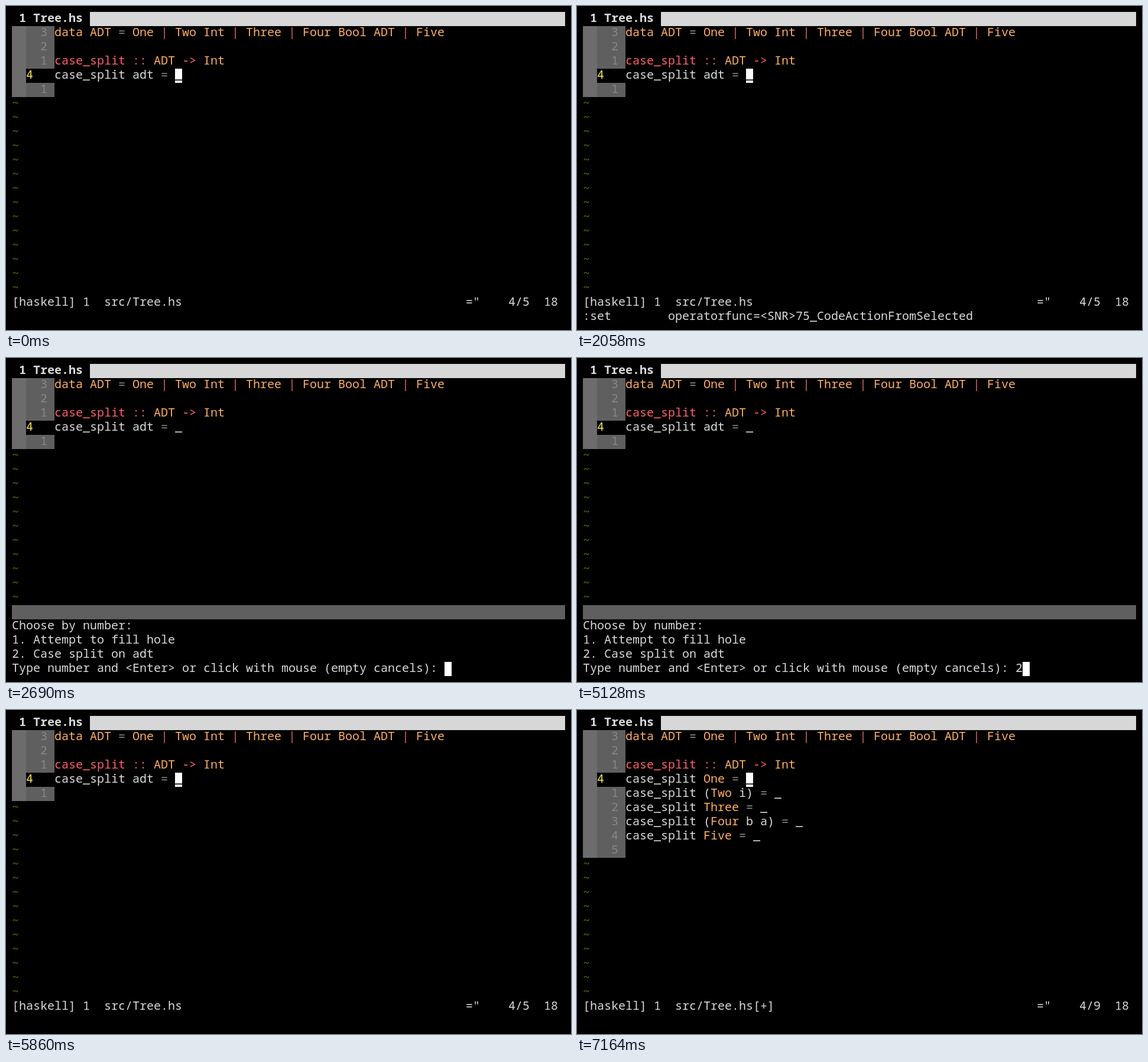
An HTML page with a canvas for the animation above (8 s loop, 956 by 548 pixels).

```html
<!DOCTYPE html>
<html lang="en">
<head>
<meta charset="utf-8">
<title>Case split in the editor</title>
<style>
  html, body { margin: 0; width: 100%; height: 100%; overflow: hidden; background: #000; }
  canvas { display: block; }
</style>
</head>
<body>
<canvas id="screen" width="956" height="548"></canvas>
<script>
const ctx = document.getElementById("screen").getContext("2d");
const LOOP = 8000, CELL_W = 12, CELL_H = 24, PAD = 10, COLS = 78;
const FONT = '20px "Noto Sans Mono", monospace';
const COLOR = {
  text: "#dadada", type: "#ffaf5f", red: "#ff5f6b", pipe: "#e56a62", equals: "#8a8a8a",
  tilde: "#56700c", number: "#878787", current: "#f5e65a",
  sign: "#6c6c6c", gutter: "#5f5f5f", tabs: "#d7d7d7"
};

const HEADER = [
  "data ADT = One | Two Int | Three | Four Bool ADT | Five",
  "",
  "case_split :: ADT -> Int"
];
const BEFORE = [...HEADER, "case_split adt = _", ""];
const AFTER = [
  ...HEADER,
  "case_split One = _",
  "case_split (Two i) = _",
  "case_split Three = _",
  "case_split (Four b a) = _",
  "case_split Five = _",
  ""
];
const CURRENT = 3;
const MENU = [
  "Choose by number:",
  "1. Attempt to fill hole",
  "2. Case split on adt",
  "Type number and <Enter> or click with mouse (empty cancels): "
];

function fill(col, row, width, height, color) {
  ctx.fillStyle = color;
  ctx.fillRect(PAD + col * CELL_W, PAD + row * CELL_H, width * CELL_W, height * CELL_H);
}

function write(text, col, row, color = COLOR.text, weight = "") {
  ctx.font = `${weight} ${FONT}`;
  ctx.fillStyle = color;
  ctx.fillText(text, PAD + col * CELL_W, PAD + row * CELL_H + 17);
}

function cursor(col, row, char = "") {
  fill(col, row, 1, 1, "#fff");
  write(char, col, row, "#000");
}

function tokenColor(token, isSignature) {
  if (/^[A-Z]|^data$/.test(token)) return COLOR.type;
  if (token === "=") return COLOR.equals;
  if (token === "|") return COLOR.pipe;
  return isSignature ? COLOR.red : COLOR.text;
}

function writeCode(line, row) {
  const isSignature = line.includes("::");
  for (const { 0: token, index } of line.matchAll(/\w+|[^\w\s]+/g))
    write(token, 6 + index, row, tokenColor(token, isSignature));
}

function drawBuffer(lines, bottom) {
  fill(0, 1, 2, lines.length, COLOR.sign);
  fill(2, 1, 4, lines.length, COLOR.gutter);
  fill(2, 1 + CURRENT, 4, 1, "#000");
  lines.forEach((line, i) => {
    const row = i + 1;
    if (i === CURRENT) write(i + 1, 2, row, COLOR.current);
    else write(Math.abs(i - CURRENT), 4, row, COLOR.number);
    writeCode(line, row);
  });
  for (let row = lines.length + 1; row < bottom; row++) write("~", 0, row, COLOR.tilde);
}

function drawMenu(answer) {
  fill(0, 17, COLS, 1, COLOR.gutter);
  MENU.forEach((line, i) => write(line, 0, 18 + i));
  const end = MENU[3].length;
  write(answer, end, 21);
  cursor(end + answer.length, 21);
}

function drawStatus(lines, changed) {
  write("[haskell] 1  src/Tree.hs" + (changed ? "[+]" : ""), 0, 20);
  write('="', 64, 20);
  write(`4/${lines.length}`, 70, 20);
  write("18", 75, 20);
}

function draw(t) {
  const changed = t >= 5910;
  const menuOpen = t >= 2690 && t < 5860;
  const lines = changed ? AFTER : BEFORE;

  ctx.fillStyle = "#000";
  ctx.fillRect(0, 0, 956, 548);
  write("1 Tree.hs", 1, 0, COLOR.text, "600");
  fill(11, 0, COLS - 11, 1, COLOR.tabs);
  drawBuffer(lines, menuOpen ? 17 : 20);

  if (menuOpen) {
    drawMenu(t >= 4030 ? "2" : "");
    return;
  }
  cursor(23, 1 + CURRENT, "_");
  drawStatus(lines, changed);
  if (t >= 1110 && t < 2690) {
    write(":set", 0, 21);
    write("operatorfunc=<SNR>75_CodeActionFromSelected", 12, 21);
  }
}

const start = performance.now();
function frame() {
  draw((performance.now() - start) % LOOP);
  requestAnimationFrame(frame);
}
frame();
</script>
</body>
</html>
```
